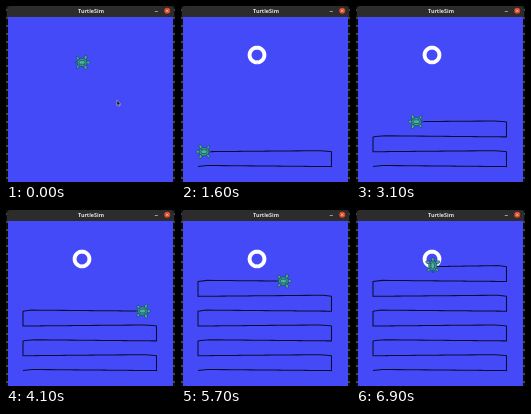
These frames come from a looping animation (169x176 px, 7000 ms). An HTML page:

```html
<!DOCTYPE html>
<html lang="en">
<head>
<meta charset="utf-8">
<title>TurtleSim</title>
<style>
  html, body { margin: 0; width: 100%; height: 100%; overflow: hidden; background: #111; }
  svg { display: block; width: 169px; height: 176px; }
  text { font: bold 5.4px "Open Sans", sans-serif; fill: #e4e4e4; text-anchor: middle; }
</style>
</head>
<body>
<svg viewBox="0 0 169 176">
  <defs>
    <pattern id="desk" width="4" height="8" patternUnits="userSpaceOnUse">
      <rect width="4" height="8" fill="#0c0c0c"/>
      <rect y="3" width="4" height="2" fill="#444"/>
    </pattern>
  </defs>
  <rect width="169" height="176" fill="url(#desk)"/>
  <path d="M1 11V3Q1 0 4 0H165Q168 0 168 3V11Z" fill="#2d2c2c"/>
  <text x="85" y="7">TurtleSim</text>
  <path d="M148.8 5.5h3" stroke="#bbb" stroke-width=".8"/>
  <circle cx="161.2" cy="4.7" r="3" fill="#e04a2c"/>
  <path d="M160.1 3.6l2.2 2.2m0-2.2l-2.2 2.2" stroke="#fff" stroke-width=".6"/>
  <rect x="2" y="11" width="165" height="165" fill="#454af8"/>

  <path id="ring" fill="none" stroke="#fff" stroke-width="3.9"/>
  <path id="trail" fill="none" stroke="#0c0c30" stroke-width="1.05" stroke-linejoin="round"/>

  <g id="turtle" stroke="#14405c" stroke-width=".6">
    <g fill="#45b0a0">
      <ellipse cx="3.4" cy="-4.6" rx="1.4" ry="2.6" transform="rotate(20 3.4 -4.6)"/>
      <ellipse cx="3.4" cy="4.6" rx="1.4" ry="2.6" transform="rotate(-20 3.4 4.6)"/>
      <ellipse cx="-4" cy="-4" rx="1.2" ry="2.2" transform="rotate(-40 -4 -4)"/>
      <ellipse cx="-4" cy="4" rx="1.2" ry="2.2" transform="rotate(40 -4 4)"/>
      <path d="M-4.5-.8L-7.3 0L-4.5.8Z"/>
      <ellipse cx="6" rx="2" ry="1.5"/>
      <ellipse rx="4.9" ry="4.2" fill="#389a90"/>
    </g>
    <path d="M-2-1.8H2L3.2 0L2 1.8H-2L-3.2 0ZM-2-1.8L-3-3M2-1.8L3-3M-2 1.8L-3 3M2 1.8L3 3" fill="#4cb497"/>
  </g>

  <path id="cursor" d="M110.8 94.2v5.4l1.3-1.1.9 1.8 1-.5-.8-1.7h1.6Z" fill="#111" stroke="#ddd" stroke-width=".5"/>
</svg>
<script>
const LOOP = 7000, STEP = 100;
const LEFT = 17, RIGHT = 150.5, BOTTOM = 160.6, ROW = 14.85;
const RING = { x: 76, y: 49, r: 7.4 }, RING_TIME = 200, CURSOR_TIME = 1000;
// Moment each row starts; the last one closes the final row.
const starts = [309, 1207, 2076, 2945, 3800, 4680, 5559, 6400, 7170];

const [ring, trail, turtle, cursor] =
  ["ring", "trail", "turtle", "cursor"].map(id => document.getElementById(id));
const ramp = (t, from, length) => Math.min(1, Math.max(0, (t - from) / length));

function ringPose(t) {
  const a = Math.PI / 2 - 2 * Math.PI * ramp(t, 0, RING_TIME);
  return { x: RING.x + RING.r * Math.cos(a), y: RING.y + RING.r * Math.sin(a), heading: a - Math.PI / 2 };
}

// Each row slows down towards its end, then the turtle turns, climbs and turns again.
function rowPose(t) {
  const row = Math.max(0, starts.findLastIndex(s => s <= t));
  const next = starts[row + 1], dir = row % 2 ? -1 : 1;
  const length = row === 7 ? RIGHT - RING.x : RIGHT - LEFT;
  const progress = Math.min(1, 1.02 * (1 - Math.exp(-0.007 * Math.max(0, t - starts[row]))));
  const travelled = length * progress;
  const climb = ramp(t, next - 280, 160);
  const turns = ramp(t, next - 330, 50) + ramp(t, next - 120, 120);
  const wobble = Math.min(1, travelled / 8) * (1 - progress);
  return {
    x: (dir > 0 ? LEFT : RIGHT) + dir * travelled,
    y: BOTTOM - ROW * (row + climb) - 1.2 * wobble,
    heading: (dir > 0 ? 0 : Math.PI) - dir * turns * Math.PI / 2
  };
}

const point = p => `${p.x.toFixed(2)} ${p.y.toFixed(2)}`;

function trace(pose, from, to, step) {
  if (to <= from) return "";
  const points = [];
  for (let t = from; t < to; t += step) points.push(point(pose(t)));
  points.push(point(pose(to)));
  return "M" + points.join("L");
}

function draw(now) {
  const t = Math.floor((now % LOOP) / STEP) * STEP;
  const pose = t < 300 ? ringPose(t) : rowPose(t);
  ring.setAttribute("d", trace(ringPose, 0, Math.min(t, RING_TIME), 5));
  trail.setAttribute("d", trace(rowPose, starts[0], t, 10));
  turtle.setAttribute("transform",
    `translate(${point(pose)}) rotate(${(pose.heading * 180 / Math.PI).toFixed(1)})`);
  cursor.style.display = t < CURSOR_TIME ? "" : "none";
}

const begin = performance.now();
function tick() {
  draw(performance.now() - begin);
  requestAnimationFrame(tick);
}
tick();
</script>
</body>
</html>
```
